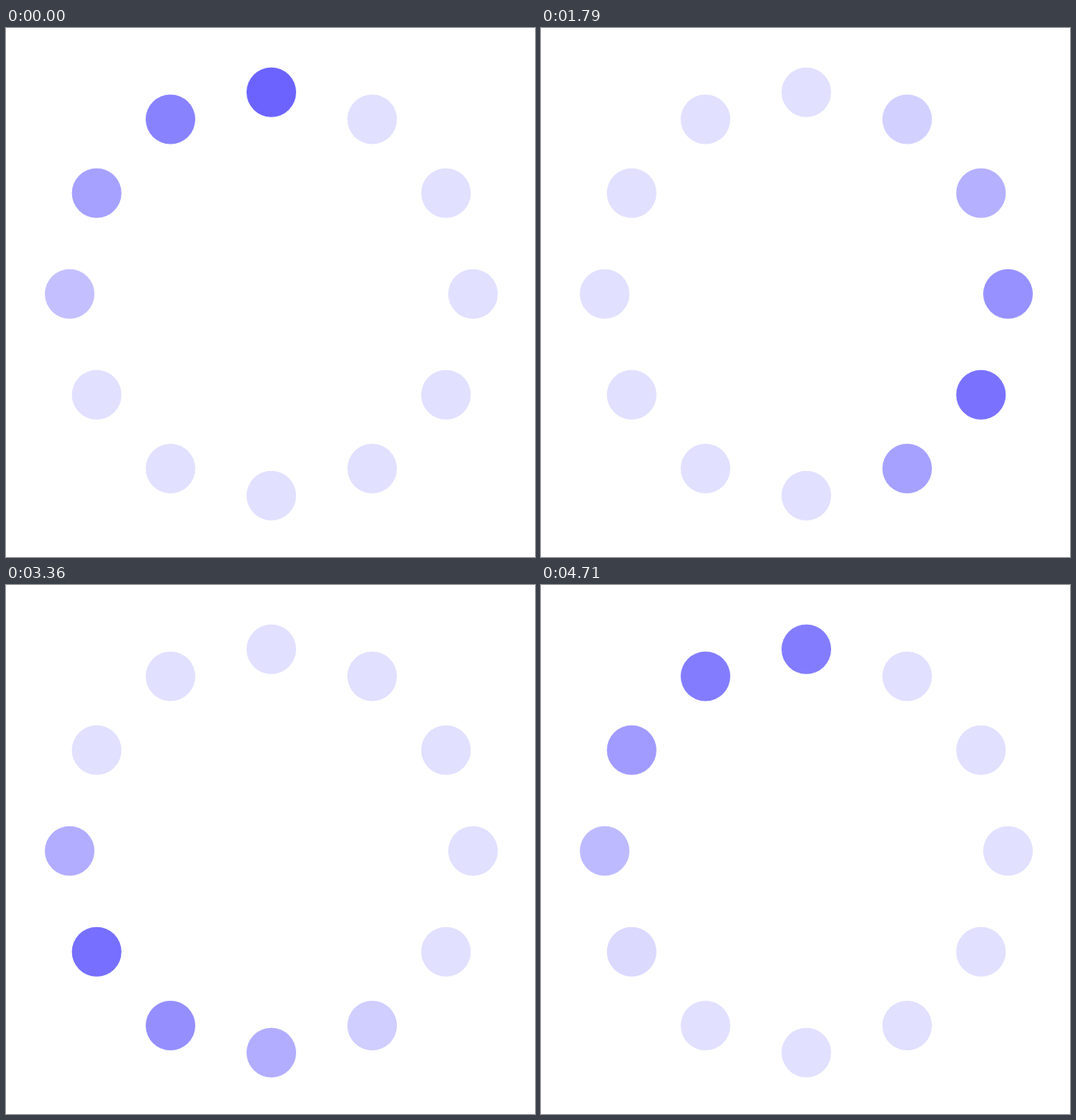
An HTML page for the animation above (4.78 s loop, 640 by 640 pixels).

```html
<!DOCTYPE html>
<html>
<head>
<meta charset="utf-8">
<style>
  html, body { margin: 0; width: 100%; height: 100%; overflow: hidden; background: #fff; }
  svg { display: block; width: 100%; height: 100%; }
</style>
</head>
<body>
<svg viewBox="0 0 640 640" fill="#6c63ff"></svg>
<script>
const LOOP = 4780, DOTS = 12, TAIL = 4;
const svg = document.querySelector('svg');

const dots = Array.from({ length: DOTS }, (_, k) => {
  const angle = k * 2 * Math.PI / DOTS;
  const dot = document.createElementNS('http://www.w3.org/2000/svg', 'circle');
  dot.setAttribute('cx', 321 + 244 * Math.sin(angle));
  dot.setAttribute('cy', 321.75 - 244 * Math.cos(angle));
  dot.setAttribute('r', 30);
  return svg.appendChild(dot);
});

// Steps since the dot's peak: fade over the tail, rise during the last step.
function glow(age) {
  if (age < TAIL) return 1 - age / TAIL;
  return Math.max(0, age - (DOTS - 1));
}

// Shown at 14 fps, moving on a 25 fps grid with ten ticks per dot.
function headAt(ms) {
  const shown = Math.floor((Math.floor(ms / 10) * 10 + 5) * 14 / 1000);
  return Math.ceil(shown * 25 / 14) / 10;
}

function draw() {
  const head = headAt(performance.now() % LOOP);
  dots.forEach((dot, k) => {
    const age = (head - k + DOTS) % DOTS;
    dot.setAttribute('fill-opacity', 0.2 + 0.8 * glow(age));
  });
  requestAnimationFrame(draw);
}
draw();
</script>
</body>
</html>
```
